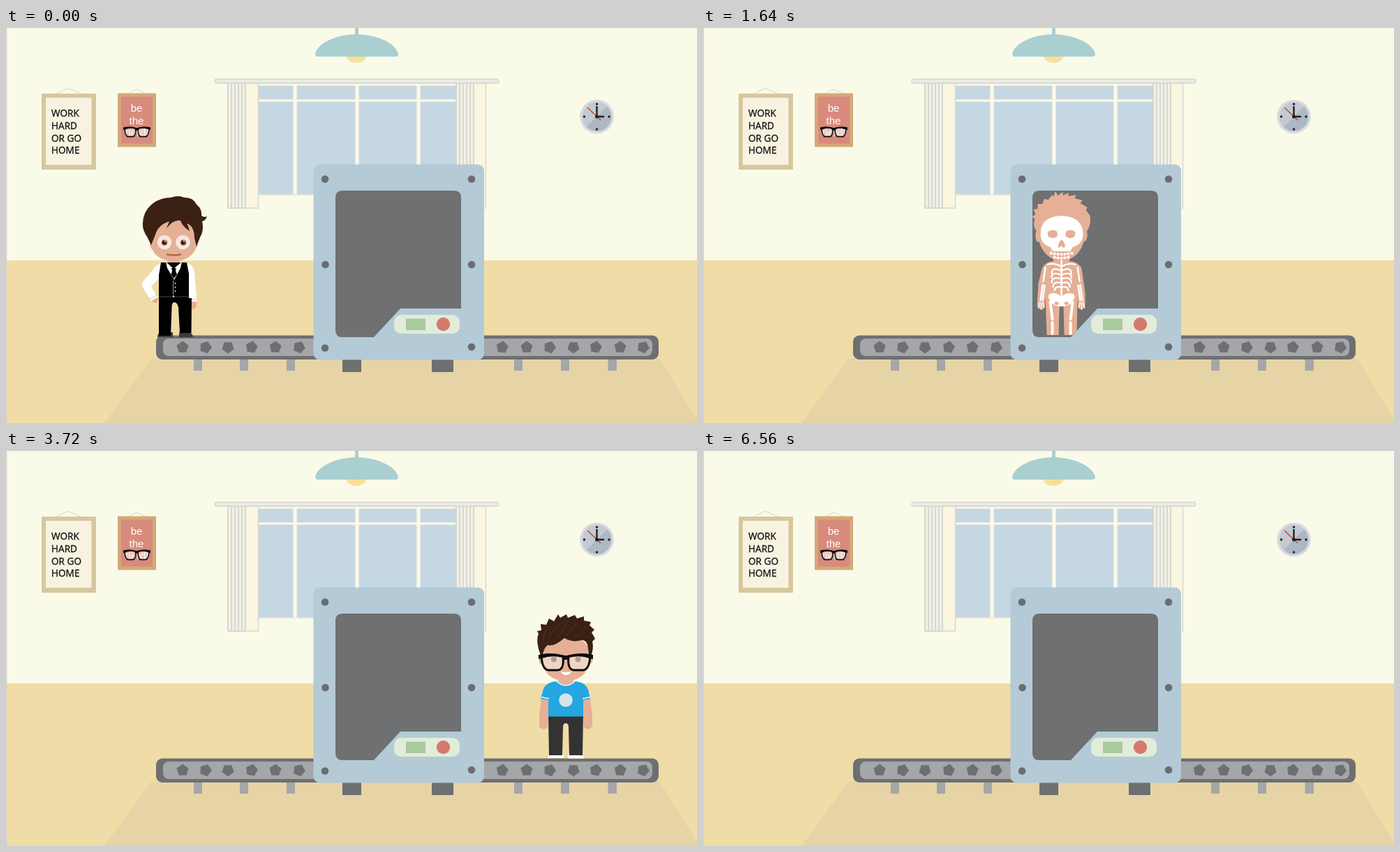
Recreate the animation shown at these times as an HTML page. Size 990 px wide and 566 px high, loop 6.72 s.

```html
<!DOCTYPE html>
<html lang="en">
<head>
<meta charset="utf-8">
<title>Conveyor</title>
<style>
  html, body { margin: 0; width: 100%; height: 100%; overflow: hidden; background: #fafae8; }
  svg { display: block; width: 990px; height: 566px; }
  .motto { font: 500 13.6px "Open Sans", "Noto Sans", sans-serif; fill: #111; stroke: #111; stroke-width: .3; }
  .poster { font: 15px "Liberation Sans", Arial, sans-serif; fill: #fff; text-anchor: middle; }
  .dark { fill: #6e6f71; }
  .grey { fill: #a5a6a8; }
  .skin { fill: #e5b095; }
  .hair { fill: #3a2114; }
  .bone { fill: none; stroke: #fff; stroke-linecap: round; stroke-linejoin: round; }
</style>
</head>
<body>
<svg viewBox="0 0 990 566">
  <defs>
    <clipPath id="pane"><path d="M482 233H642Q652 233 652 243V402H565L527 443H482Q472 443 472 433V243Q472 233 482 233Z"/></clipPath>
    <linearGradient id="dial" x2="1" y2="1">
      <stop offset=".5" stop-color="#c3cad3"/><stop offset=".5" stop-color="#adb8c5"/>
    </linearGradient>
    <g id="specs">
      <path d="M-35-9Q-20-12-4-8Q-2 12-12 12H-25Q-34 11-35-9ZM35-9Q20-12 4-8Q2 12 12 12H25Q34 11 35-9Z"
        fill="#f6eee6" fill-opacity=".6" stroke="#0c0c0c" stroke-width="3"/>
      <path d="M-39-10Q-20-14-3-9H3Q20-14 39-10V-4L34-5Q20-10 5-6L3-3H-3L-5-6Q-20-10-34-5L-39-4Z" fill="#0c0c0c"/>
    </g>
    <g id="bill">
      <path d="M-22-9C-14-14-6-12 0-9S14-8 21-13L23 8C16 13 8 12 1 9S-13 9-21 14Z"
        fill="#f3efb9" stroke="#6ba254" stroke-width="1.8" stroke-linejoin="round"/>
      <path d="M-18-7C-12-10-6-8 0-6S12-5 17-8L19 6C13 9 7 8 1 6S-11 6-17 9Z" fill="none" stroke="#d5dc96" stroke-width=".8"/>
      <ellipse rx="6" ry="5" fill="#6fa65b"/>
      <path d="M-22-9l5-2-4 6ZM21-13l-5 3 5 3ZM23 8l-5 2 4-6ZM-21 14l5-3-5-4Z" fill="#6fa65b"/>
      <circle cx="-13" cy="1" r="1.5" fill="#6fa65b"/><circle cx="13" cy="-1" r="1.5" fill="#6fa65b"/>
    </g>
  </defs>

  <!-- room -->
  <path fill="#fafae8" d="M0 0H990V333H0Z"/>
  <path fill="#efdca6" d="M0 333H990V566H0Z"/>
  <path fill="#e6d4a6" d="M208 474H937L990 561V566H141Z"/>
  <path fill="#dccfc9" d="M0 0H1.3V566H0Z"/>

  <!-- lamp -->
  <path fill="#f6e09b" d="M488 40A14 10 0 0 0 516 40Z"/>
  <path fill="#aacfd1" d="M500 0H505V9C535 10 559 23 562 37Q562 41 558 41H447Q443 41 443 37C446 23 470 10 500 9Z"/>

  <!-- window -->
  <path fill="#fbf9e9" stroke="#d9dad2" d="M361 79H645V239H361Z"/>
  <path fill="#c5d7e3" stroke="#d3d9d6" d="M362 83H411V102H362ZM417 83H500V102H417ZM506 83H588V102H506ZM594 83H645V102H594ZM362 106H411V238H362ZM417 106H500V238H417ZM506 106H588V238H506ZM594 106H645V238H594Z"/>
  <path fill="#faf6df" stroke="#d8d8cf" stroke-width="1.5" d="M318 79H361.500V258H318ZM645 79H687.500V258H645Z"/>
  <path fill="#f2f1e6" d="M318 79H343V258H318ZM645 79H670V258H645Z"/>
  <path fill="none" stroke="#d2d2ca" stroke-width="1.6" d="M318 79V258M323 79V258M328 79V258M333 79V258M338 79V258M343 79V258M318 258H343M645 79V258M650 79V258M655 79V258M660 79V258M665 79V258M670 79V258"/>
  <rect x="299" y="73.500" width="407" height="5.500" rx="2.700" fill="#ecece5" stroke="#d4d5cd" stroke-width="1.300"/>

  <!-- pictures -->
  <path fill="none" stroke="#d9d6c9" d="M71 95L89 86L109 95M175 94L187 88L201 94"/>
  <path fill="#d6c79e" d="M51 94H129V203H51Z"/>
  <path fill="#f8f2e1" d="M57 100H122.500V196H57Z"/>
  <g class="motto"><text x="65" y="127">WORK</text><text x="65" y="145">HARD</text><text x="65" y="162.500">OR GO</text><text x="65" y="180">HOME</text></g>
  <path fill="#d3a979" d="M160 93.500H215V170.500H160Z"/>
  <path fill="#d88a7d" d="M165 98.500H210V165.500H165Z"/>
  <g class="poster"><text x="187" y="119.500">be</text><text x="187" y="138">the</text><text x="187.500" y="154.500">nerd!</text></g>
  <use href="#specs" transform="translate(187.500 148.500) scale(.5 .6)"/>

  <!-- clock -->
  <circle cx="846.500" cy="127" r="24.300" fill="#dadbdf"/>
  <circle cx="846.500" cy="127" r="21" fill="url(#dial)"/>
  <path stroke="#c0472f" stroke-width="1.400" d="M833 114L852 132"/>
  <path stroke="#222" stroke-width="2.400" fill="none" d="M846.500 112V127H857"/>
  <g fill="#222"><circle cx="846.500" cy="127" r="2.500"/><circle cx="846.500" cy="109" r="1.700"/><circle cx="864" cy="127" r="1.700"/><circle cx="846.500" cy="145" r="1.700"/><circle cx="828.500" cy="127" r="1.700"/></g>

  <!-- belt -->
  <path class="grey" d="M269 474H281V491H269ZM335 474H347V491H335ZM402 474H414V491H402ZM728 474H740V491H728ZM795 474H807V491H795ZM862.500 474H875V491H862.500Z"/>
  <rect class="dark" x="215" y="440.500" width="720" height="34.500" rx="9"/>
  <rect class="grey" x="225" y="445" width="701" height="25" rx="8"/>
  <g id="rollers" class="dark"></g>

  <!-- clerk -->
  <g id="clerk">
    <path fill="#3b3b3b" d="M217 443Q217 436 224 436H239V443ZM248 436H261Q268 437 268 443H248Z"/>
    <path class="skin" d="M207 386L216 384Q220 391 215 394Q208 393 207 386ZM261 391H273Q274 402 268 403Q261 402 261 391ZM232 328H249V342H232Z"/>
    <path fill="#fff" d="M225 336Q216 338 210 347L195 365Q194 370 198 375L208 391L217 386L208 370L221 357ZM257 336Q268 338 270 349L273.500 392H261.500Z"/>
    <path fill="none" stroke="#d4aa98" stroke-width=".8" d="M206 388L216 383M261.500 389H273"/>
    <path d="M222 336H259L262 352V387H266L265.500 437H249L247 400Q245 393 241.500 393Q237.500 393 237.500 400L236 441H219V354Z"/>
    <path fill="#fff" d="M229 335L240 345L252 335L250 344L241 361L231 344Z"/>
    <path d="M237 344H243.500L243 348L245 353L240.500 359L236.500 353L238 348Z"/>
    <path stroke="#777" stroke-width=".6" d="M219 385H263"/>
    <path stroke="#ddd" stroke-width=".7" d="M239.500 362V382"/>
    <g fill="#ddd"><circle cx="242.500" cy="366" r="1.100"/><circle cx="242.500" cy="371.500" r="1.100"/><circle cx="242.500" cy="377" r="1.100"/><circle cx="240" cy="384.500" r="1.200"/></g>
    <path class="skin" d="M207 296Q209 280 240 270Q271 278 274 297L273 307Q276 312 271 318Q263 334 240 334Q217 333 210 318Q204 313 207 304Z"/>
    <path class="hair" d="M208 311L202 299Q195 289 196 279Q197 261 211 251Q222 243 236 243Q248 239 255 243Q268 242 273 253Q281 259 280 269Q284 272 288 270Q286 276 281 277Q284 290 278 300L273 313L270 301Q270 284 259 280Q262 285 263 291Q253 285 250 276Q240 274 230 287L234 277Q218 282 214 296Z"/>
    <g fill="#f5e7df"><circle cx="227" cy="307" r="10.300"/><circle cx="253.500" cy="307" r="10.300"/></g>
    <g fill="#7c4426"><circle cx="227" cy="307.500" r="4"/><circle cx="254" cy="307.500" r="4"/></g>
    <g fill="#2b150b"><circle cx="226.500" cy="307.500" r="2.200"/><circle cx="253.500" cy="307.500" r="2.200"/></g>
    <g fill="#fff"><circle cx="228" cy="305.500" r="1.100"/><circle cx="255" cy="305.500" r="1.100"/></g>
    <path fill="none" stroke="#a86b49" stroke-width="2.600" stroke-linecap="round" d="M231 324.500Q241 326.500 250 324.500"/>
  </g>

  <!-- coder -->
  <g id="coder">
    <path fill="#fff" d="M776 440Q777 434 784 434H799V440ZM805 434H820Q828 435 828 440.500H805Z"/>
    <path class="skin" d="M767 354H778L776 396Q769 402 764 395V380ZM826 354H837L840 380V394Q835 402 828 396ZM791 322H813V338H791Z"/>
    <path fill="#24a6e1" d="M789 330Q802 341 815 330Q830 331 834 342L837 355L827 357V382H777V357L766 355L770 341Q774 331 789 330Z"/>
    <path fill="none" stroke="#e8f6fc" stroke-width="1.500" d="M789 330Q802 342 815 330M767 352.500L778 355M826 355L837 352.500"/>
    <circle cx="802" cy="357" r="9.800" fill="#d3e4ea"/>
    <path fill="#333" d="M777 380.500H827L826 436H807L806 396Q806 390 802 390Q798 390 798 396L797 436H778Z"/>
    <path class="skin" d="M767 287Q774 266 802 266Q830 266 837 287L838 293Q843 297 839 304Q836 306 835 306Q829 329 802 329.500Q775 329 769 306Q763 305 763 298Q764 293 767 292Z"/>
    <path class="hair" d="M768 298L764 287Q759 270 763 262L761 258L767 257L766 248L774 249L778 240L785 244L791 234L794 239L803 234L805 239L815 235L818 240L828 237L828 243L838 245L836 250L843 256L839 260L844 269L840 273Q843 284 836 299L834 283Q833 271 825 271Q812 275 800 268Q785 281 776 278Q769 284 768 298Z"/>
    <path fill="none" stroke="#57351f" stroke-width="1" d="M778 268Q784 252 798 246M789 268Q799 259 803 246M802 265Q812 255 817 247M815 267Q826 262 830 252M770 272Q770 260 778 252"/>
    <use href="#specs" transform="translate(802 302)"/>
    <g fill="#b59a8e"><circle cx="785" cy="298.500" r="4"/><circle cx="819.500" cy="298.500" r="4"/></g>
    <path fill="#fff" d="M795 316Q803 318 810 315.500Q808 321 802 321Q797 320.500 795 316Z"/>
  </g>

  <!-- machine -->
  <path class="dark" d="M482 474H509V493H482ZM610 474H641V493H610Z"/>
  <rect x="440.500" y="195.500" width="244.500" height="280" rx="9" fill="#b4cad6"/>
  <g clip-path="url(#pane)">
    <path fill="#6f7072" d="M472 233H652V443H472Z"/>
    <g id="xray">
      <path class="skin" d="M529 291Q523 282 527 274L523 270L528 267L525 260L531 259L531 252L538 252L540 245L546 246L552 239L554 242L556 234L560 240L567 235L567 240L575 236L575 241L586 239L584 244L595 247L592 251L602 257L600 261L606 269Q608 282 601 292Q604 296 600 305L597 306Q592 324 577 331L576 334Q590 335 594 345L599 380V398Q595 407 589 401L588 385L587 440H569L568 400Q565 393 562 400L561 440H544L542 385L541 401Q535 407 530 398L532 366L537 345Q541 335 554 334L553 331Q538 324 533 306L530 307Q526 298 529 291Z"/>
      <path fill="#fff" d="M535 295Q535 270 565 269Q595 270 596 295Q596 310 581 314Q578 320 576 320H554Q552 320 549 314Q535 310 535 295Z"/>
      <path class="skin" d="M545 293Q550 287 558 291Q562 300 554 301Q545 302 545 293ZM585 293Q580 287 572 291Q568 300 576 301Q585 302 585 293ZM565 303Q571 308 570 314Q567 316 565 312Q562 316 560 314Q560 308 565 303Z"/>
      <path class="bone" stroke-width="4" stroke-dasharray=".1 4.900" d="M550 322.500Q565 326 581 322.500"/>
      <path class="bone" stroke-width="4" stroke-dasharray=".1 4.900" d="M555 328.500Q565 331 577 328"/>
      <path class="bone" stroke-width="3" stroke-dasharray="2 2.600" d="M565 334V382"/>
      <path class="bone" stroke-width="2.200" d="M545 339Q555 336 563 341M585 339Q575 336 567 341M563 347Q551 342 551 352M567 347Q579 342 579 352M563 353Q550 349 551 358M567 353Q580 349 579 358M563 359Q551 356 551 365M567 359Q579 356 579 365M563 365Q553 363 553 371M567 365Q577 363 577 371M563 371Q556 370 555 376M567 371Q574 370 575 376"/>
      <path class="bone" stroke-width="2.500" d="M542 343L539 363M588 343L591 363M538 368L535 390M541 369L538 390M592 368L595 390M589 369L592 390"/>
      <path class="bone" stroke-width="1.500" d="M534 393L532 401M536 394V403M538 393L540 400M596 393L598 401M594 394V403M592 393L590 400"/>
      <path fill="#fff" d="M564 384Q556 378 548 381Q544 385 549 391Q553 399 565 399Q577 399 581 391Q586 385 582 381Q574 378 566 384Z"/>
      <path class="skin" d="M558 392a3 2.500 0 1 0 .1 0ZM572 392a3 2.500 0 1 0 .1 0Z"/>
      <path class="bone" stroke-width="4" d="M549 393L552 417M581 393L578 417M552 422V438M578 422V438"/>
    </g>
  </g>
  <g fill="#6b6d70"><circle cx="457" cy="216.500" r="5.300"/><circle cx="667" cy="216.500" r="5.300"/><circle cx="457.500" cy="339" r="5.300"/><circle cx="667" cy="339" r="5.300"/><circle cx="457" cy="458.500" r="5.300"/><circle cx="667" cy="457" r="5.300"/></g>
  <rect x="556" y="411" width="94" height="27" rx="10" fill="#e2ecd9"/>
  <path fill="#a9ca9d" d="M573 416.500H601V433H573Z"/>
  <circle cx="626.500" cy="424.500" r="9.700" fill="#d57a6e"/>

  <g id="bills"></g>
</svg>
<script>
const LOOP = 6720, STEP = 40;
const $ = id => document.getElementById(id);
const NS = "http://www.w3.org/2000/svg";

function add(parent, tag, attrs) {
  const el = document.createElementNS(NS, tag);
  for (const k in attrs) el.setAttribute(k, attrs[k]);
  parent.append(el);
  return el;
}

[253, 286, 318, 352, 386, 420, 711, 746, 779, 813, 845, 880, 913].forEach((x, i) => {
  const turn = [0, 20, 36, 10, 4, 24, 8][i % 7] * Math.PI / 180;
  const points = [0, 1, 2, 3, 4].map(k => {
    const a = turn - Math.PI / 2 + k * Math.PI * 0.4;
    return (x + 9 * Math.cos(a)).toFixed(1) + "," + (457.5 + 9 * Math.sin(a)).toFixed(1);
  });
  add($("rollers"), "polygon", { points: points.join(" ") });
});

// place at 4880 ms, drift and fall in px/ms, tilt, size, flutter
const bills = [
  { x: 830, y: 260, vx: -0.22, vy: 0.78, tilt: -47, size: 1.13, sway: 0 },
  { x: 777.5, y: 322, vx: -0.06, vy: 0.78, tilt: -49, size: 1.25, sway: 0 },
  { x: 834, y: 311.5, vx: -0.12, vy: 0.78, tilt: -48, size: 1.29, sway: 0 },
  { x: 739.5, y: 388.5, vx: 0, vy: 0.62, tilt: -2, size: 0.97, sway: 1 }
];
for (const b of bills) b.el = add($("bills"), "use", { href: "#bill" });

function place(el, shown, x, y, rest = "") {
  el.style.display = shown ? "" : "none";
  if (shown) el.setAttribute("transform", `translate(${x.toFixed(2)} ${y.toFixed(2)}) ${rest}`);
}

function draw(t) {
  place($("clerk"), t < 1360, 0.18645 * t - 1.575e-5 * t * t, -0.0018 * t);
  place($("xray"), t >= 1360 && t < 2760, 0.0989 * (t - 2160), 0);

  const d = Math.min(t, 4040) - 3720;
  place($("coder"), t >= 2760 && t < 6560, 0.144 * d, -0.0035 * d);

  const u = t - 4880;
  for (const b of bills) {
    const s = b.sway * Math.sin(0.0157 * u);
    place(b.el, t >= 4280 && t < 5320, b.x + b.vx * u - 4 * s, b.y + b.vy * u - 21 * s,
      `rotate(${(b.tilt + 0.02 * u * (1 - b.sway) + 14 * s).toFixed(2)}) scale(${b.size})`);
  }
}

const start = performance.now();
function tick() {
  const t = Math.max(0, performance.now() - start) % LOOP;
  draw(Math.floor(t / STEP) * STEP);
  requestAnimationFrame(tick);
}
draw(0);
requestAnimationFrame(tick);
</script>
</body>
</html>
```
